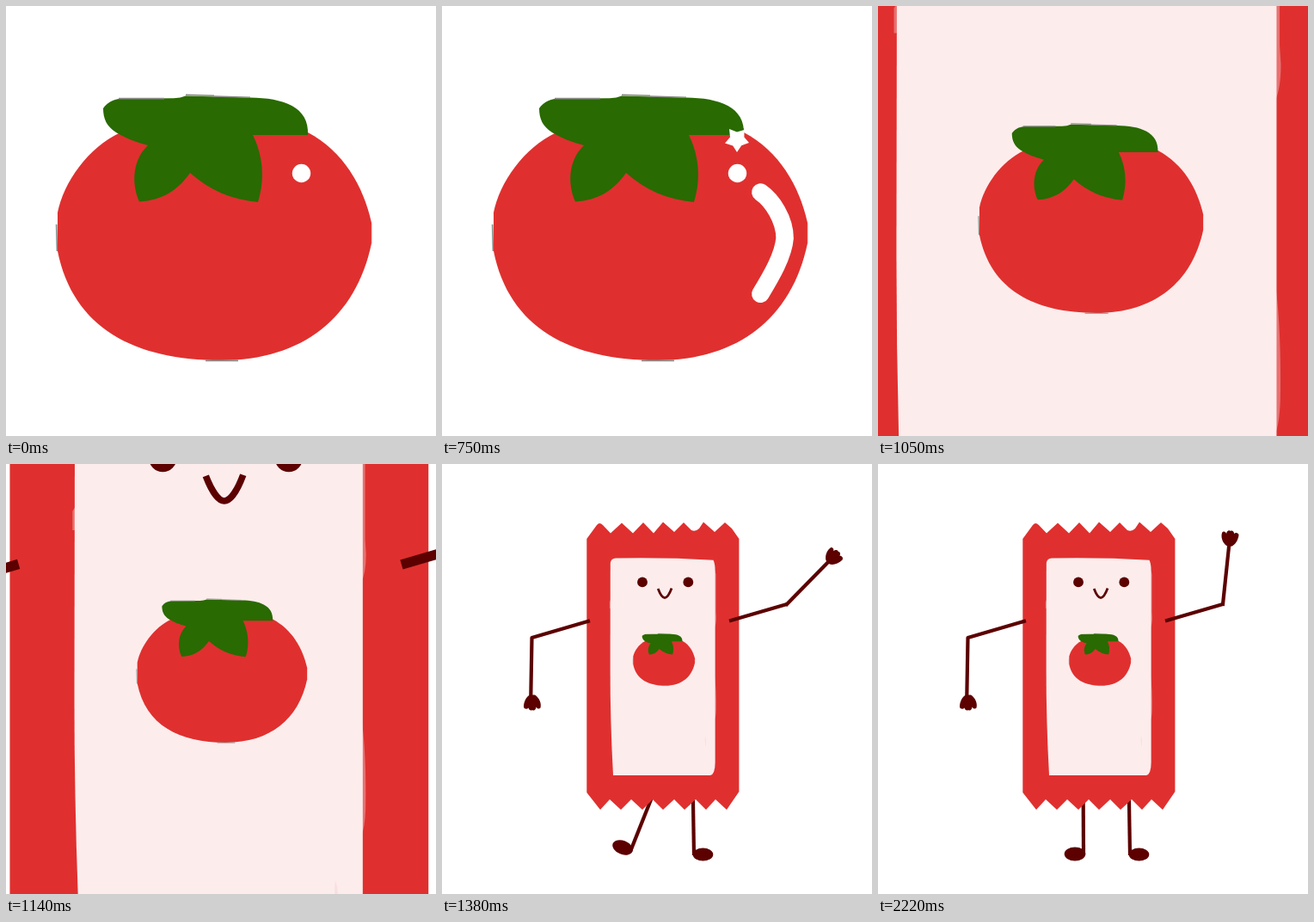
Write an HTML page that moves like this. It is 500 by 500 pixels and loops after 2.25 s.

```html
<!DOCTYPE html>
<html lang="en">
<head>
<meta charset="utf-8">
<title>Ketchup packet</title>
<style>
  html, body { margin: 0; width: 100%; height: 100%; overflow: hidden; background: #fff; }
  svg { display: block; width: 100%; height: 100%; }
  .limb { fill: none; stroke: #5c0000; stroke-width: 4.2; stroke-linecap: butt; stroke-linejoin: round; }
  .dark { fill: #5c0000; }
  .red { fill: #df302f; }
  .pink { fill: #fdecec; }
  .streak { fill: #fdecec; opacity: .35; }
</style>
</head>
<body>
<svg viewBox="0 0 500 500">
  <defs>
    <path id="hand" class="dark" d="M-3 9C-8 6-11-1-9.5-6C-8-8-5.5-7-4.5-5C-4.5-8-2-10 0-8.5C1.5-10 4-8.5 4.5-6C6-8 9.5-7.5 10-5C10 1 7 7 3 9Z"/>
  </defs>
  <g id="world">
    <g id="packet">
      <g id="leftLeg">
        <path class="limb" d="M238.5 365L239 454"/>
        <ellipse class="dark" cx="229" cy="453.5" rx="12.3" ry="8"/>
      </g>
      <g id="rightLeg">
        <path class="limb" d="M291.5 365L293 455"/>
        <ellipse class="dark" cx="303.5" cy="454" rx="11.8" ry="7.6"/>
      </g>
      <path class="red" d="M168.3 87L180 71Q183 67 187 71L196 80.5L209 68.5L222 80.5L234 68L246 80.5L257 67.5L270 79L281 68L290 77Q295 79 299 75L304 67.5L317 79L329 68L337 75L345.4 87V381L331 402L318 390L307 402L295 390L282 402L270 390L257 402L245 390L233 402L220 390L208 402L195 390L184 402L168.3 382Z"/>
      <path class="streak" d="M317 124L318.6 128V172L319 178Q319 186 317 190ZM317 247Q319.2 262 318.8 286Q318.5 294 317 297ZM196 158L194.8 160V168H196Z"/>
      <path class="pink" d="M195.8 115Q196.5 110 202 109.6Q260 108.5 315.5 111.7Q317.6 116 317.6 124V347Q317.5 361 312 362H199Q195.5 300 195.6 236Z"/>
      <path fill="#f8e0e0" d="M306 316Q308 322 306.5 329Q305.2 322 306 316Z"/>
      <circle class="dark" cx="233" cy="137.4" r="5.9"/>
      <circle class="dark" cx="286.3" cy="137.4" r="5.9"/>
      <path class="limb" style="stroke-width:2.8" d="M251.2 145C253.5 151 256.5 155.6 259 155.6C262 155.6 265 150 267 144.6"/>
      <path class="limb" d="M172 182.3L104.5 202L103.3 270"/>
      <use href="#hand" transform="translate(105 277.5) rotate(180)"/>
      <path class="limb" d="M334 182.5L401 163"/>
      <g id="forearm">
        <path class="limb" d="M401 165V93"/>
        <use href="#hand" x="401" y="86"/>
      </g>
    </g>
    <g id="tomato">
      <path class="red" d="M60 240C67 205 95 165 133 147H351C392 169 415 208 425 252V276C407 362 345 412 250 412C150 412 78 375 60 285Z"/>
      <path fill="#296a02" d="M113 119C118 112 124 109 133 107.8L195 107.3Q203 107 209 104.5L284 106.5C322 107 353 117 351 150H287C298 172 302 200 293 228C262 225 236 214 214 194C200 214 182 226 155 227.5C145 205 148 178 165 162C150 158 140 154 128 147C117 140 113 131 113 119Z"/>
      <path fill="none" stroke="#8a8a86" stroke-width="1.6" d="M58.6 254L59.4 285M131 107.6H184M209 103.4L242 104.2M242 105L284 106.2M232 412.4H270"/>
      <path stroke="#e8d8d8" stroke-width="1.4" d="M425.6 253V276"/>
    </g>
  </g>
  <g id="shine" fill="#fff">
    <circle cx="343.5" cy="194.5" r="10.7"/>
    <path id="arc" fill="none" stroke="#fff" stroke-width="20.5" stroke-linecap="round" pathLength="1" d="M370.3 216.5C384 226 398.6 248 398.6 270C397 290 383 314 370.3 334.8"/>
    <path id="star" d="M343 170L338.2 162.6L329 159.5L335 152.5L334 143L343 146.5L351.5 144L351.4 152.5L357 159L348.2 162.2Z"/>
  </g>
</svg>
<script>
const LOOP = 2250, STEP = 30, ZOOM = 5.08;
const SCENE_CUT = 900, ZOOM_TIME = 420;
const el = id => document.getElementById(id);
const clamp = u => Math.max(0, Math.min(1, u));
const smooth = u => u * u * (3 - 2 * u);
const scaleAbout = (s, x, y) => `translate(${x} ${y}) scale(${s}) translate(${-x} ${-y})`;
const setTransform = (id, value) => el(id).setAttribute('transform', value);
const show = (id, on) => el(id).setAttribute('visibility', on ? 'visible' : 'hidden');

// Keys are [time, value] pairs, eased between neighbours.
const forearmKeys = [[1170, 6], [1440, 50], [1650, 24], [1890, 50], [2220, 6]];
const leftLegKeys = [[1200, 0], [1380, 22], [1620, 0]];
const rightLegKeys = [[1500, 0], [1740, -11.5], [1980, 0]];

function valueAt(keys, t) {
  let value = keys[0][1];
  for (let i = 1; i < keys.length; i++) {
    const [t0, a] = keys[i - 1], [t1, b] = keys[i];
    if (t >= t0) value = a + (b - a) * smooth(clamp((t - t0) / (t1 - t0)));
  }
  return value;
}

function draw(t) {
  const closeUp = t < SCENE_CUT;
  show('shine', closeUp);
  show('packet', !closeUp);

  const drawn = clamp(t / 420);
  show('arc', closeUp && drawn > 0);
  el('arc').setAttribute('stroke-dasharray', `${drawn} 2`);
  setTransform('star', scaleAbout(clamp((t - 570) / 180), 343, 156));

  const zoom = ZOOM + (1 - ZOOM) * clamp((t - SCENE_CUT) / ZOOM_TIME);
  setTransform('world', scaleAbout(zoom, 262, 220));
  setTransform('forearm', `rotate(${valueAt(forearmKeys, t)} 401 163)`);
  setTransform('leftLeg', `rotate(${valueAt(leftLegKeys, t)} 239 401)`);
  setTransform('rightLeg', `rotate(${valueAt(rightLegKeys, t)} 292 410)`);
}

setTransform('tomato', scaleAbout(1 / ZOOM, 262, 220));
const start = performance.now();
function tick() {
  const t = (performance.now() - start) % LOOP;
  draw(Math.floor(t / STEP) * STEP);
  requestAnimationFrame(tick);
}
tick();
</script>
</body>
</html>
```
